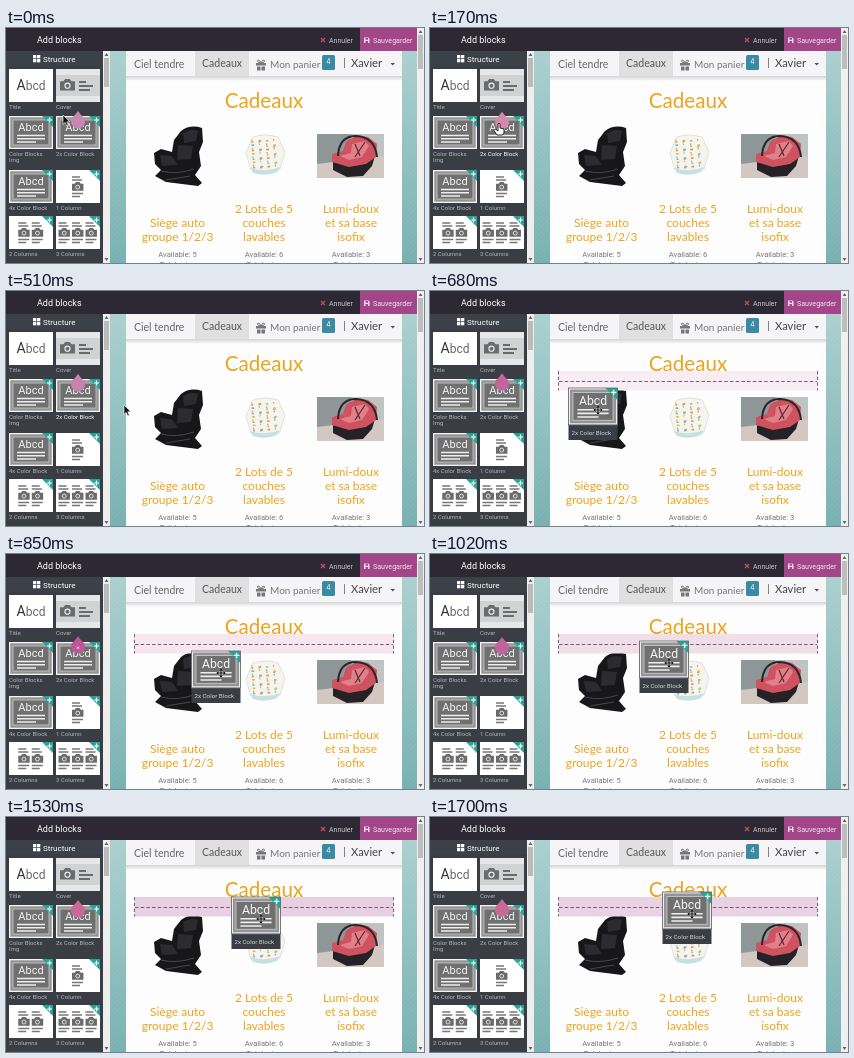
An HTML page that plays this animation: 418 by 235 pixels, repeating every 2040 ms.

```html
<!DOCTYPE html>
<html lang="fr">
<meta charset="utf-8">
<title>Drag a block</title>
<style>
html, body { margin: 0; width: 100%; height: 100%; overflow: hidden; background: #2b2833 }
svg { display: block; width: 100vw; height: 100vh; font-family: Roboto, "Open Sans", sans-serif }
.hand { font-family: Lato, Inter, sans-serif }
</style>
<svg id="stage" viewBox="0 0 418 235"></svg>
<script>
const rect = (x, y, w, h, fill, more = '') =>
  `<rect x="${x}" y="${y}" width="${w}" height="${h}" fill="${fill}" ${more}/>`;
const path = (d, fill, more = '') => `<path d="${d}" fill="${fill}" ${more}/>`;
const line = (d, color, width = 1, more = '') =>
  path(d, 'none', `stroke="${color}" stroke-width="${width}" ${more}`);
const text = (x, y, size, fill, s, more = '') =>
  `<text x="${x}" y="${y}" font-size="${size}" fill="${fill}" ${more}>${s}</text>`;
const at = (x, y, body, id = '') => `<g transform="translate(${x} ${y})" ${id && `id="${id}"`}>${body}</g>`;
const mid = 'text-anchor="middle"';
const hand = (x, y, size, fill, s, more = '') => text(x, y, size, fill, s, `class="hand" ${more}`);

// Block previews, each 44 by 33
const corner = path('M33 0H44V11Z', '#25a597') + line('M40.5 1.5v5M38 4h5', '#fff', 1.2);
const camera = path('M0 2h3l1.5-2h4L10 2h3v8H0z', '#6b6b6b') +
  '<circle cx="6.5" cy="5.8" r="2.2" fill="#6b6b6b" stroke="#eee"/>';
const paper = rect(0, 0, 44, 33, '#fff');
const colorBlock = rect(0, 0, 44, 33, '#f4f4f4') + rect(1.3, 1.3, 41.4, 30.4, '#949494') +
  rect(4, 4, 36, 25, '#707070', 'stroke="#c8c8c8" stroke-width=".8"') +
  text(22, 15, 11, '#f4f4f4', 'Abcd', mid) +
  line('M8 19.5h28M8 22.8h28M8 26h19', '#eee', 1.4) + corner;
const columns = n => paper + Array.from({ length: n }, (_, i) =>
  at(22 + (i - (n - 1) / 2) * 13.5 - 6, 0,
    line('M0 7h8M0 10h10M0 23.5h11M0 26.5h8', '#777', 1.4) +
    `<g transform="translate(0 12) scale(.88)">${camera}</g>`)).join('') + corner;
const titleBlock = paper + text(22, 20.5, 12, '#666', '<tspan fill="#333" font-size="14">A</tspan>bcd', mid);
const coverBlock = rect(0, 0, 44, 33, '#e6e7e8') + rect(0, 6, 44, 21, '#d0d2d4') +
  `<g transform="translate(4 10) scale(1.15)">${camera}</g>` +
  line('M23 13h7M23 17h14M23 21h11', '#6b6b6b', 2);

const blocks = [
  [3, 41, titleBlock, 'Title'], [50, 41, coverBlock, 'Cover'],
  [3, 88, colorBlock, 'Color Blocks'], [50, 88, colorBlock, '2x Color Block', 'hot'],
  [3, 142, colorBlock, '4x Color Block'], [50, 142, columns(1), '1 Column'],
  [3, 188, columns(2), '2 Columns'], [50, 188, columns(3), '3 Columns']
];
const panel = rect(0, 23, 104, 212, '#3b3d45') + rect(0, 23, 104, 15, '#3b4049') +
  [[27, 27], [31, 27], [27, 31], [31, 31]].map(([x, y]) => rect(x, y, 3.3, 3.3, '#fff')).join('') +
  text(37, 34, 8, '#fff', 'Structure') +
  blocks.map(([x, y, art, label, id]) =>
    at(x, y, art) + text(x, y + 39.5, 6, '#b4b6ba', label, id ? `id="${id}"` : '')).join('') +
  text(3, 134, 6, '#b4b6ba', 'Img') +
  rect(97, 23, 7, 212, '#eee') + rect(98, 30, 5, 29, '#bbb') +
  path('M98.5 28l2-3 2 3zM98.5 230l2 3 2-3z', '#666');

const header = rect(0, 0, 411, 23, '#2c2934') + rect(354, 0, 57, 23, '#a24689') +
  text(31, 15, 9, '#fff', 'Add blocks') +
  line('M315 10l4 4m0-4l-4 4', '#c9485f', 1.3) + text(323, 14.5, 7, '#c9c6cd', 'Annuler') +
  path('M358 9.5h4.5l1 1V15h-5.5zM359.5 10v1.7h2.5V10zM359.5 13v2h2.5v-2z', '#f0dcea', 'fill-rule="evenodd"') +
  text(367, 14.5, 7.1, '#f3e6ef', 'Sauvegarder');

// Products
const seat = path('M175 103Q184 96 196 100L197 114 193 124 195 138 189 147 196 155 192 158 160 154 149 148 155 142 149 136 148 125 155 121 166 124 168 112Z', '#17171a') +
  path('M177 105q8-5 15-2l-2 10-12 2zM172 117l15 1-2 13-14 1zM154 127l12 1 6 9-16 1z', '#2c2c30') +
  line('M155 143q15 4 33-2M160 152l24-4', '#4d4d52', .9);
const spots = Array.from({ length: 42 }, (_, i) => {
  const x = 245 + i * 7.3 % 29, y = 111 + (i / 6 | 0) * 4.3 + i * 5 % 3;
  const color = ['#efb94c', '#79b9c6', '#ea9557', '#a9c98a'][i * 7 % 11 % 4];
  return rect(x, y, 1.5 + i % 3 * .7, 1.8, color, 'rx=".7"');
}).join('');
const nappy = path('M247 109Q259 105 272 109L279 124 274 141Q260 150 245 142L240 125Z', '#f5f4ee', 'stroke="#dcdcd6" stroke-width=".8"') +
  spots + path('M244 140q16 5 30-1l-3 5q-12 5-24 1z', '#c6e1e3');
const photo = rect(311, 106, 67, 44, '#8f9799') + rect(345, 106, 33, 27, '#bfc3c2') +
  path('M311 136l67-8v22h-67z', '#d2c8c1') +
  path('M327 128l12 4 30-4-3 10-9 10-16 1-14-7z', '#242226') +
  path('M340 114Q349 106 362 109L371 116 370 129 360 136 343 139 326 134 326 126 337 123Z', '#cf5260') +
  path('M346 116l13-3 4 5-7 11-13 3-9-4 11-3z', '#e2808a') +
  line('M332 128Q333 108 350 108Q369 109 371 129', '#2b2529', 2) +
  line('M349 116l5 12M359 114l-10 15', '#54292f', 1.2);

const gold = '#eca41c';
const product = (x, y, names, stock) =>
  names.map((s, i) => hand(x, y + i * 14, 12, gold, s, mid)).join('') +
  text(x, 229, 7.6, '#777', 'Available: ' + stock, mid) + text(x, 238.5, 7.6, '#777', 'Total price', mid);

const page = rect(104, 23, 307, 212, 'url(#teal)') + rect(104, 23, 307, 212, 'url(#weave)') +
  rect(120, 23, 276, 212, '#fdfdfd') + rect(120, 48, 276, 5, 'url(#shade)') +
  rect(120, 23, 276, 25, '#f5f5f7') + rect(189, 23, 54, 25, '#e0e0e1') +
  hand(128, 40, 10.5, '#686868', 'Ciel tendre') +
  hand(216, 38.5, 10.5, '#555', 'Cadeaux', mid) +
  path('M250 35h10v2.5h-10zM251 38.5h3.5v4H251zM255.5 38.5h3.5v4h-3.5z', '#777') +
  line('M255 35q-5-1-3-3 2 0 3 3 1-3 3-3 2 2-3 3', '#777') +
  hand(264, 39.5, 10, '#777', 'Mon panier') +
  rect(316, 27, 13, 15, '#3b8aa3', 'rx="1.5"') + hand(322.5, 36, 7, '#fff', '4', mid) +
  line('M338.5 30v10', '#666', .8) +
  hand(345, 38.5, 11.2, '#444', 'Xavier') + path('M384.5 35h4.5l-2.2 2.5z', '#555') +
  hand(258, 79.5, 20.6, gold, 'Cadeaux', mid) +
  seat + nappy + photo +
  product(171.5, 199, ['Siège auto', 'groupe 1/2/3'], 5) +
  product(258, 185, ['2 Lots de 5', 'couches', 'lavables'], 6) +
  product(345, 185, ['Lumi-doux', 'et sa base', 'isofix'], 3) +
  rect(411, 0, 7, 235, '#f0f0f0') + rect(412, 7, 5, 34, '#bdbdbd') +
  path('M412.5 5l2-3 2 3zM412.5 230l2 3 2-3z', '#666');

const zone = `<g id="zone">${rect(129, 80, 258, 19.5, '#f5e5ee', 'id="zoneFill"')}` +
  line('M129 90.5H387M128.5 80v19.5M387.5 80v19.5', '#75446b', .9, 'stroke-dasharray="3.5 2.2"') + '</g>';
const dragged = rect(0, 0, 49, 52, '#3b3d45') +
  `<g transform="scale(1.114)">${colorBlock}</g>` + rect(0, 0, 49, 37, 'none', 'stroke="#62646a" stroke-width=".8"') +
  text(3, 47, 6.2, '#d5d5d8', '2x Color Block');
const tip = path('M0-9Q3-4.5 6-2.2A7 7 0 1 1-6-2.2Q-3-4.5 0-9Z', '#c987b0', 'id="drop"') +
  line('M-1 1.5l2 2m0-2l-2 2', '#fff', .8, 'id="cross"');
const arrow = path('M0 0V9.5L2.2 7.4 3.8 11 5.3 10.3 3.8 6.8H6.8Z', '#111', 'stroke="#fff" stroke-width=".6"');
const finger = path('M-1-5Q0-6.5 1-5V-1L5 0V4L3.5 6H-2L-5 1.5-3.5 0-1 2Z', '#fff', 'stroke="#111" stroke-width=".9"');
const move = line('M-4 0H4M0-4V4', '#fff', 2.4) + line('M-4 0H4M0-4V4', '#111', 1.2) +
  path('M-4.6 0l2-2v4zM4.6 0l-2-2v4zM0-4.6l2 2h-4zM0 4.6l2-2h-4z', '#111');

stage.innerHTML = `<defs>
  <linearGradient id="teal" x2="0" y2="1"><stop stop-color="#abd0cf"/><stop offset="1" stop-color="#78b1b1"/></linearGradient>
  <linearGradient id="shade" x2="0" y2="1"><stop stop-color="#d4d4d4"/><stop offset="1" stop-color="#fdfdfd"/></linearGradient>
  <pattern id="weave" width="5" height="5" patternUnits="userSpaceOnUse">${line('M0 5L5 0', '#fff', .7, 'opacity=".08"')}</pattern>
  </defs>` + page + panel + header + zone + at(72, 91, tip, 'tip') + at(0, 0, dragged, 'ghost') +
  at(0, 0, arrow, 'arrow') + at(0, 0, finger, 'finger') + at(0, 0, move, 'move');

const $ = id => document.getElementById(id);
const place = (id, x, y) => $(id).setAttribute('transform', `translate(${x} ${y})`);
const show = (id, on) => $(id).style.display = on ? '' : 'none';

// Pointer position for every 170 ms step
const pointer = [[57, 87], [69, 101], [91, 108], [118, 114], [168, 119], [215, 119],
  [239, 109], [255, 102], [255, 102], [255, 102], [262, 97], [262, 97]];
const dropColors = ['#c987b0', '#d489ac', '#cd88ae', '#c784ab', '#c2659d', '#bd5797', '#c0649b', '#c96a96'];
const zoneColors = ['#f8edf3', '#f6e7ee', '#f0dfe9', '#ebd8e5', '#e9d4e3', '#e7d1e1', '#e9d3e3'];

function draw() {
  const step = Math.floor(performance.now() % 2040 / 170);
  const [x, y] = pointer[step], dragging = step > 3;
  const kind = dragging ? 'move' : step == 1 ? 'finger' : 'arrow';
  for (const id of ['arrow', 'finger', 'move']) show(id, id == kind);
  place(kind, x, y);
  show('zone', dragging);
  show('ghost', dragging);
  place('ghost', x - 29.5, y - 22);
  $('zoneFill').setAttribute('fill', zoneColors[Math.min(Math.max(step - 4, 0), 6)]);
  $('hot').setAttribute('fill', step > 0 && step < 4 ? '#fff' : '#b4b6ba');
  $('drop').setAttribute('fill', dropColors[Math.min(step, 7)]);
  show('cross', step == 5);
  place('tip', 72, 92 + Math.sin(step * 1.05));
  requestAnimationFrame(draw);
}
draw();
</script>
</html>
```
